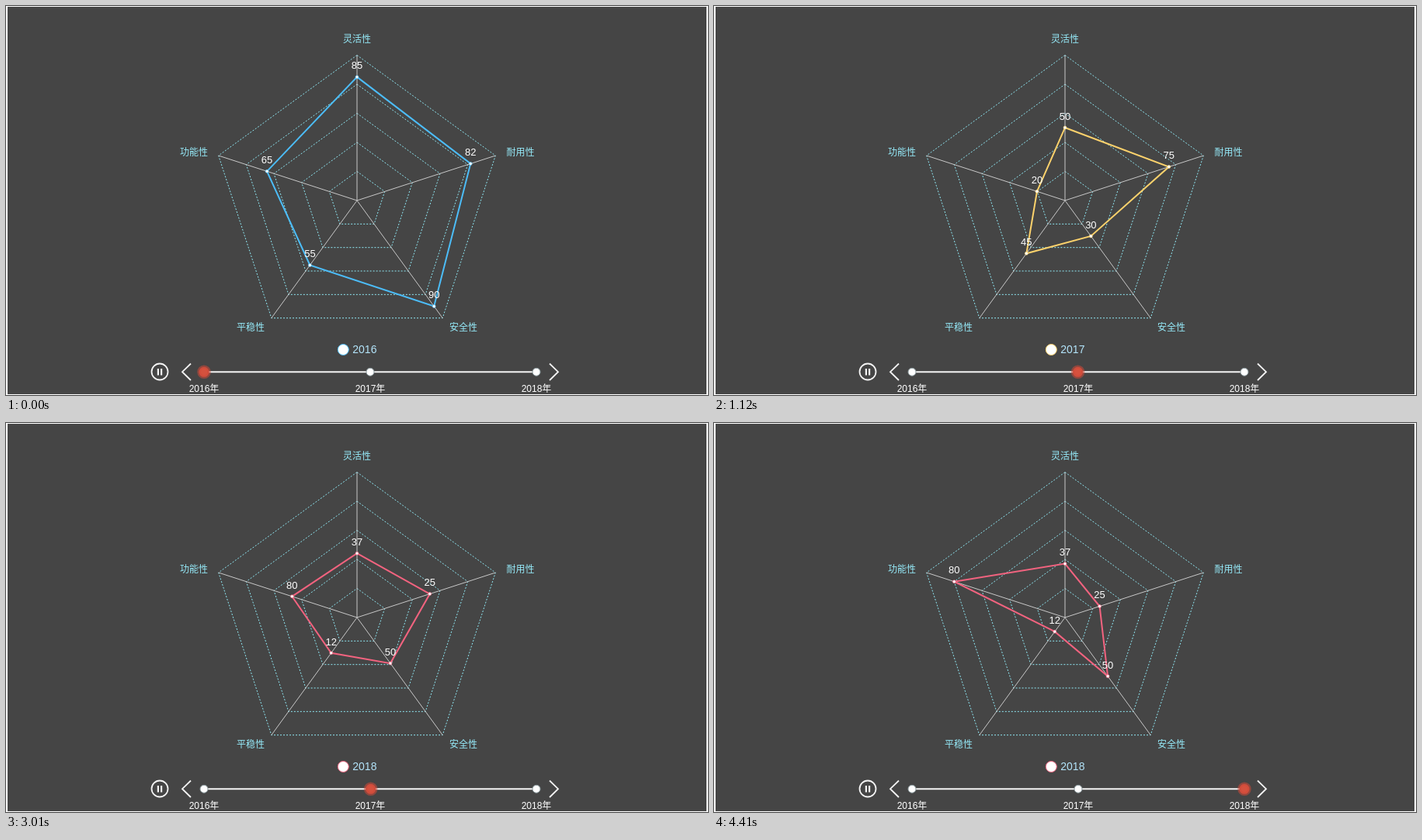
These frames come from a looping animation (904 by 502 pixels, 4480 ms). An HTML page with a canvas:

```html
<!DOCTYPE html>
<html lang="zh">
<head>
<meta charset="utf-8">
<style>
html, body { margin: 0; width: 100%; height: 100%; overflow: hidden; background: #fff; }
canvas { display: block; }
</style>
</head>
<body>
<canvas id="stage" width="904" height="502"></canvas>
<script>
const ctx = document.getElementById('stage').getContext('2d');
const LOOP = 4480, TICK = 70, DURATION = 300;
const CX = 452, CY = 251, RADIUS = 187.5;
const LATIN = '"Liberation Sans", Arial, "Noto Sans CJK SC", "Noto Sans CJK", sans-serif';
const HAN = '"Noto Sans CJK SC", "Noto Sans CJK", sans-serif';

// show: colours and numbers switch; start: shapes begin to move
const years = [
  { name: '2016', x: 255, color: '#4cbdf9', show: 0, start: 0, values: [85, 82, 90, 55, 65] },
  { name: '2017', x: 469, color: '#fcd26c', show: 840, start: 870, values: [50, 75, 30, 45, 20] },
  { name: '2018', x: 683, color: '#f2637f', show: 2940, start: 2956, values: [37, 25, 50, 12, 80] }
];
const axes = [['灵活性', 452, 42.5], ['耐用性', 662.5, 188.5], ['安全性', 589, 414.5],
  ['平稳性', 315, 414.5], ['功能性', 242, 188.5]];

const cubicOut = k => 1 - (1 - k) ** 3;
const quinticInOut = k => k < 0.5 ? 16 * k ** 5 : 1 - 16 * (1 - k) ** 5;
const mix = (a, b, k) => a + (b - a) * k;

function spoke(i, value) {
  const angle = i * Math.PI * 2 / 5, r = RADIUS * value / 100;
  return [CX + r * Math.sin(angle), CY - r * Math.cos(angle)];
}

function path(points, color, width, closed) {
  ctx.beginPath();
  points.forEach(p => ctx.lineTo(...p));
  if (closed) ctx.closePath();
  ctx.strokeStyle = color;
  ctx.lineWidth = width;
  ctx.stroke();
}

function dot(x, y, r, fill, stroke, width) {
  ctx.beginPath();
  ctx.arc(x, y, r, 0, Math.PI * 2);
  if (fill) {
    ctx.fillStyle = fill;
    ctx.fill();
  }
  if (stroke) {
    ctx.strokeStyle = stroke;
    ctx.lineWidth = width;
    ctx.stroke();
  }
}

function text(str, x, y, size, color, family = LATIN, align = 'center') {
  ctx.font = `${size}px ${family}`;
  ctx.textAlign = align;
  ctx.textBaseline = 'middle';
  ctx.fillStyle = color;
  ctx.fillText(str, x, y);
}

function drawGrid() {
  ctx.setLineDash([2, 2]);
  for (let level = 20; level <= 100; level += 20) {
    path(axes.map((_, i) => spoke(i, level)), '#8fe9f5', 1, true);
  }
  ctx.setLineDash([]);
  axes.forEach(([label, x, y], i) => {
    path([[CX, CY], spoke(i, 100)], '#c8c8c8', 1);
    text(label, x, y, '500 12', '#96ebfa', HAN);
  });
}

function drawSeries(year, values) {
  const points = values.map((v, i) => spoke(i, v));
  path(points, year.color, 2, true);
  points.forEach(([x, y]) => dot(x, y, 2, '#fff', year.color, 0.6));
  points.forEach(([x, y], i) => text(year.values[i], x, y - 13.8, 13, '#fff'));
  dot(434.3, 443.5, 7, '#fff', year.color, 1);
  text(year.name, 446.3, 444, 14, '#b3e4fa', LATIN, 'left');
}

function drawTimeline(handleX) {
  const white = '#f4f4f4';
  dot(198, 472, 10.5, null, white, 1.8);
  ctx.fillStyle = white;
  ctx.fillRect(194.8, 468, 2.2, 8.5);
  ctx.fillRect(199, 468, 2.2, 8.5);
  path([[238, 461.5], [227, 472.2], [238, 483]], white, 1.8);
  path([[700, 461.5], [711, 472.2], [700, 483]], white, 1.8);
  path([[255, 472.3], [683, 472.3]], white, 2);
  years.forEach(({ name, x }) => {
    dot(x, 472.3, 5, '#fff', '#8b9a9e', 1);
    text(name + '年', x, 495, 12, '#fff');
  });
  dot(handleX, 472.3, 6.5, '#d5513e', 'rgba(205,72,56,.55)', 4.5);
}

function draw(t) {
  const now = years.findLastIndex(y => t >= y.show);
  const year = years[now], from = years[Math.max(0, now - 1)];
  const k = Math.min(1, Math.max(0, (t - year.start) / DURATION));

  ctx.fillStyle = '#fff';
  ctx.fillRect(0, 0, 904, 502);
  ctx.fillStyle = '#454545';
  ctx.fillRect(2, 1, 900, 500);
  drawGrid();
  drawSeries(year, year.values.map((v, i) => mix(from.values[i], v, cubicOut(k))));
  drawTimeline(mix(from.x, year.x, quinticInOut(k)));
}

function frame() {
  const t = performance.now() % LOOP;
  draw(Math.floor(t / TICK) * TICK);
  requestAnimationFrame(frame);
}
frame();
</script>
</body>
</html>
```
